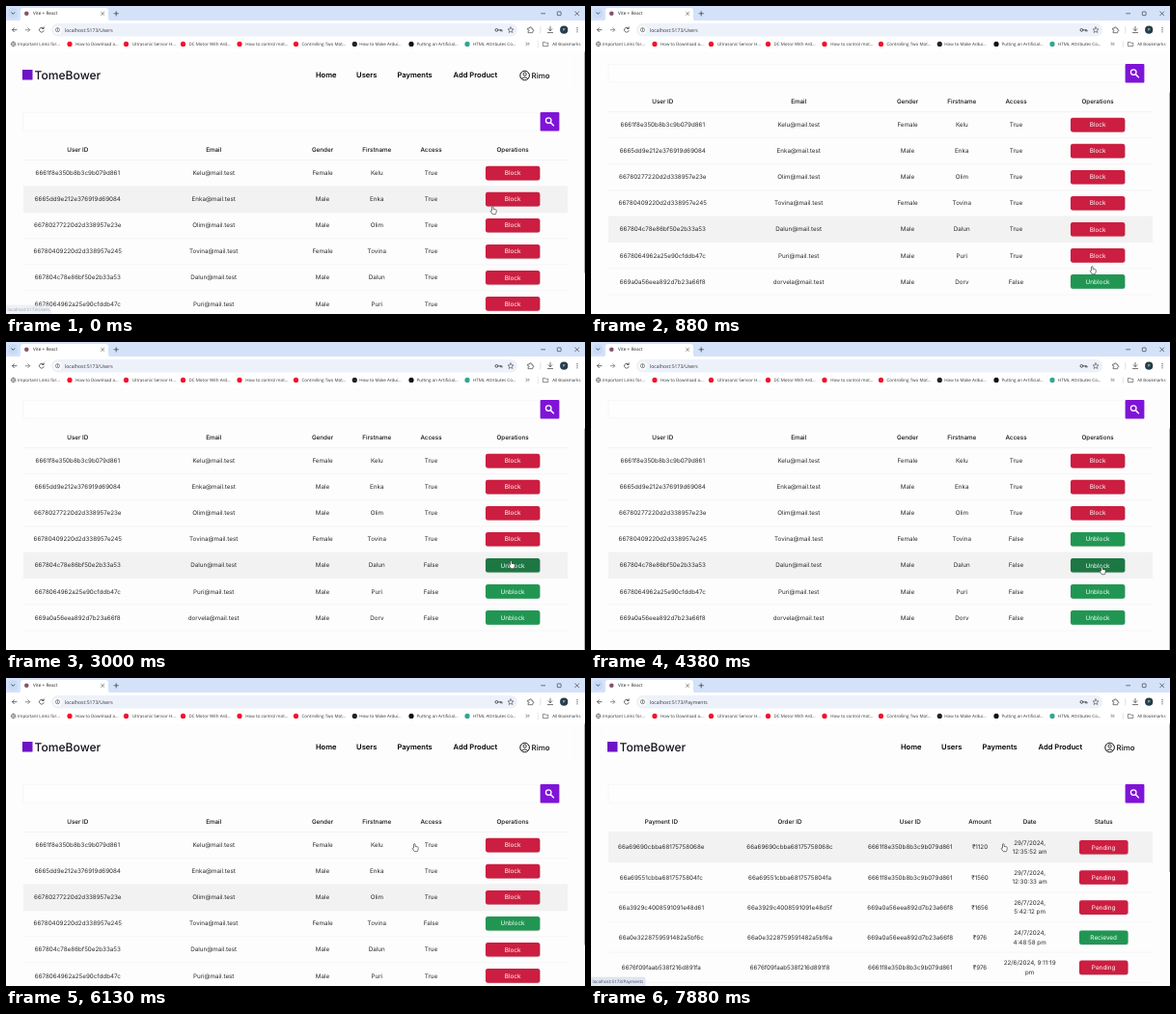
Write an HTML page that moves like this. It is 600 px wide and 319 px high and loops after 8 s.

```html
<!DOCTYPE html>
<html lang="en">
<head>
<meta charset="utf-8">
<title>User admin</title>
<style>
html, body { margin: 0; height: 100%; overflow: hidden; background: #fff; }
svg { display: block; width: 100vw; height: 100vh; }
text { font-family: Inter, "Open Sans", sans-serif; white-space: pre; text-rendering: geometricPrecision; }
.ui text { font-family: "Open Sans", sans-serif; }
</style>
</head>
<body>
<svg id="stage" viewBox="0 0 600 319" xmlns="http://www.w3.org/2000/svg">
  <defs><clipPath id="view"><rect y="47" width="600" height="272"/></clipPath></defs>
  <rect width="600" height="319" fill="#fdfdfd"/>
  <g clip-path="url(#view)"><g id="page"></g></g>
  <g id="chrome" class="ui"></g>
  <g id="over" class="ui"></g>
</svg>
<script>
const LOOP = 8000, TOP = 47, VIEW = 272;
const RED = '#cc1e41', DARK_RED = '#a51936', GREEN = '#219653', DARK_GREEN = '#1d7743';
const $ = id => document.getElementById(id);

const rect = (x, y, w, h, fill, r = 0, more = '') =>
  `<rect x="${x}" y="${y}" width="${w}" height="${h}" rx="${r}" fill="${fill}" ${more}/>`;
const dot = (x, y, r, fill, more = '') =>
  `<circle cx="${x}" cy="${y}" r="${r}" fill="${fill}" ${more}/>`;
const line = (d, color = '#444', w = 0.8) =>
  `<path d="${d}" fill="none" stroke="${color}" stroke-width="${w}" stroke-linecap="round" stroke-linejoin="round"/>`;
// y is the middle of the line of text
const text = (s, x, y, size, fill = '#2b2b2b', anchor = 'middle', weight = 400) =>
  `<text x="${x}" y="${(y + size * 0.36).toFixed(2)}" font-size="${size}" fill="${fill}" text-anchor="${anchor}" font-weight="${weight}">${s}</text>`;

const users = [
  ['6661f8e350b8b3c9b079d861', 'Kelu', 'Female'],
  ['6665dd9e212e376919d69084', 'Enka', 'Male'],
  ['66780277220d2d338957e23e', 'Olim', 'Male'],
  ['66780409220d2d338957e245', 'Tovina', 'Female'],
  ['667804c78e86bf50e2b33a53', 'Dalun', 'Male'],
  ['6678064962a25e90cfddb47c', 'Puri', 'Male'],
  ['669a0a56eea892d7b23a66f8', 'Dorv', 'Male', 'dorvela']
];
const payments = [
  ['66a69690cbba68175758068e', '66a69690cbba68175758068c', 0, '1120', '29/7/2024,', '12:35:52 am'],
  ['66a69551cbba6817575804fc', '66a69551cbba6817575804fa', 0, '1560', '29/7/2024,', '12:30:33 am'],
  ['66a3929c4008591091e48d61', '66a3929c4008591091e48d5f', 6, '1656', '26/7/2024,', '5:42:12 pm'],
  ['66a0e3228759591482a5bf6c', '66a0e3228759591482a5bf6a', 6, '976', '24/7/2024,', '4:48:58 pm'],
  ['6676f09faab538f216d891fa', '6676f09faab538f216d891f8', 0, '976', '22/6/2024, 9:11:19', 'pm']
];

// time, pointer x, pointer y, hovered row
const moves = [
  [0, 505, 211, 1], [130, 520, 273, 4], [1000, 520, 273, 6], [1250, 525, 285, 6],
  [1380, 526, 261, 5], [1750, 526, 234, 4], [2000, 527, 206, 3], [2130, 527, 179, 2],
  [2380, 526, 208, 3], [2500, 524, 230, 4], [3130, 529, 178, 2], [3380, 529, 208, 3],
  [4250, 530, 222, 4], [4380, 530, 236, 4], [5130, 530, 252, 5], [5250, 530, 260, 5],
  [5630, 490, 215, 3], [5750, 424, 175, 2], [6250, 424, 175, 0], [6880, 424, 112, -1],
  [7000, 424, 75, -1], [7750, 426, 120, -1], [7880, 428, 175, 0]
];
const scrolls = [[0, 0], [380, 22], [500, 39], [880, 50], [6000, 20], [6130, 0]];
// times at which a row's access is toggled
const toggles = { 3: [3880], 4: [2880, 4750], 5: [1630, 5380] };

const at = (keys, t) => keys.filter(k => k[0] <= t).pop();

function access(row, t) {
  const n = (toggles[row] || []).filter(k => k <= t).length;
  return (row < 6) === (n % 2 === 0);
}

function button(label, x, y, w, red, hot) {
  const fill = red ? (hot ? DARK_RED : RED) : (hot ? DARK_GREEN : GREEN);
  return rect(x - w / 2 + 0.3, y - 6.6, w + 0.2, 14.6, '#000', 2.5, 'opacity=".16"') +
    rect(x - w / 2, y - 7.2, w, 14.6, fill, 2.3) + text(label, x, y, 6.4, '#fff');
}

function rowBand(y, h, hover) {
  return (hover ? rect(18, y, 564, h, '#f2f2f2') : '') +
    line(`M18 ${y + h}H582`, '#ececee', 0.5);
}

function heads(names, xs) {
  return names.map((s, i) => text(s, xs[i], 148.7, 6.3, '#111', 'middle', 500)).join('') +
    line('M18 159.6H582', '#e6e6e8', 0.5);
}

function header() {
  const links = [['Home', 331.7], ['Users', 373.8], ['Payments', 423.6], ['Add Product', 486.4]];
  return rect(10, 52, 580, 39, 'none', 1, 'stroke="#f8f8f9" stroke-width=".5"') +
    rect(17, 66, 10.5, 10.5, '#6d14c4') +
    text('TomeBower', 29.5, 71.3, 12.1, '#15121c', 'start', 500) +
    links.map(([s, x]) => text(s, x, 71.3, 7.6, '#000', 'middle', 600)).join('') +
    dot(537.6, 72, 4.8, 'none', 'stroke="#111" stroke-width="1"') +
    dot(537.6, 70.5, 1.6, 'none', 'stroke="#111" stroke-width=".9"') +
    line('M534.5 75.3q3.1-3 6.2 0', '#111', 0.9) +
    text('Rimo', 544.6, 72, 7.9, '#111', 'start', 500) +
    rect(18, 110.3, 536, 18.8, '#fefefe', 1, 'stroke="#f1f1f3" stroke-width=".6"') +
    rect(553.6, 110.1, 19.8, 19.5, '#7f14d8', 1) +
    dot(562.2, 118.6, 2.8, 'none', 'stroke="#fff" stroke-width="1.3"') +
    line('M564.5 120.9L567.4 123.8', '#fff', 1.5);
}

function userTable(t, hover, px, py) {
  const xs = [74.3, 215.2, 328, 384.3, 440.5, 525.1];
  let out = heads(['User ID', 'Email', 'Gender', 'Firstname', 'Access', 'Operations'], xs);
  users.forEach(([id, name, gender, mail], i) => {
    const y = 173 + i * 27.05, ok = access(i, t);
    const hot = Math.abs(px - xs[5]) < 28 && Math.abs(py - y) < 7;
    out += rowBand(y - 13.4, 27.05, hover === i);
    [id, `${mail || name}@mail.test`, gender, name, ok ? 'True' : 'False']
      .forEach((s, c) => out += text(s, xs[c], y, 6.25));
    out += button(ok ? 'Block' : 'Unblock', xs[5], y, 56.3, ok, hot);
  });
  return out;
}

function paymentTable(hover, loaded) {
  const xs = [72.8, 206, 330.8, 403, 454.6, 531.2];
  let out = heads(['Payment ID', 'Order ID', 'User ID', 'Amount', 'Date', 'Status'], xs);
  if (loaded) payments.forEach(([id, order, user, sum, day, hour], i) => {
    const y = 175.2 + i * 31.15, open = i !== 3;
    out += rowBand(y - 15.6, 31.15, hover === i);
    [id, order, users[user][0], '₹' + sum].forEach((s, c) => out += text(s, xs[c], y, 6.25));
    out += text(day, xs[4], y - 4.7, 6.25) + text(hour, xs[4], y + 4.7, 6.25);
    out += button(open ? 'Pending' : 'Recieved', xs[5], y, 50.5, open, false);
  });
  return out;
}

function browser() {
  const marks = [
    ['Important Links for...', 7.6, 12, '#666'], ['How to Download a...', 66, 72, '#f0142c'],
    ['Ultrasonic Sensor H...', 124.5, 131, '#f0142c'], ['DC Motor With Ard...', 183.5, 189.5, '#f0142c'],
    ['How to control mot...', 242, 248.3, '#f0142c'], ['Controlling Two Mot...', 300.5, 306.5, '#f0142c'],
    ['How to Make Ardui...', 361.3, 366.3, '#222'], ['Putting an Artificial...', 420, 425.5, '#111'],
    ['HTML Attributes Co...', 478, 484, '#35a58c']
  ];
  return rect(0, 0, 600, 16, '#d3e2f9') + rect(0, 15, 600, 32, '#fff') +
    rect(2.5, 2.5, 9.5, 10, '#c8daf6', 3) + line('M5.8 6.8l1.5 1.6 1.5-1.6', '#333') +
    `<path d="M12 15.5q3 0 3-3V5q0-3 3-3h85q3 0 3 3v7.5q0 3 3 3z" fill="#fff"/>` +
    dot(21.3, 7.8, 2.3, '#85506f') + text('Vite + React', 28, 7.8, 4.7, '#222', 'start') +
    line('M98.6 6.3l3 3m0-3l-3 3', '#444', 0.6) + line('M112 7.8h4.4m-2.2-2.2v4.4', '#333', 0.7) +
    line('M554.6 7.8h4M589.7 5.8l4 4m0-4l-4 4', '#222', 0.6) +
    rect(571.3, 5.9, 3.8, 3.8, 'none', 0.5, 'stroke="#222" stroke-width=".6"') +
    line('M11 24.7H6.5m2-2l-2 2 2 2') + line('M20.2 24.7h4.5m-2-2l2 2-2 2', '#777') +
    line('M38.8 23.2a2.4 2.4 0 1 0 .4 2.4M39.2 21.8v1.7h-1.7') +
    rect(47, 18, 483, 13.4, '#edf1fa', 6.7) + dot(53.5, 24.7, 4.2, '#fff') +
    dot(53.5, 24.7, 2.1, 'none', 'stroke="#444" stroke-width=".6"') + line('M53.5 24.5v1.1M53.5 23.4v.1', '#444', 0.6) +
    dot(508.4, 24.9, 1.4, 'none', 'stroke="#333" stroke-width=".8"') + line('M510 24.9h4v1.2m-1.4-1.2v1', '#333') +
    line('M523 21.9l.9 1.9 2.1.2-1.6 1.4.5 2.1-1.9-1.1-1.9 1.1.5-2.1-1.6-1.4 2.1-.2z', '#444', 0.6) +
    line('M541 23h1.4q0-1.3.9-1.3t.9 1.3h1.5v1.5q1.2.1 1.2.9t-1.2.9v1.4H541v-1.5q1-.1 1-.8t-1-.8z', '#444', 0.7) +
    line('M553.8 21.5v6.5', '#c3d3ee', 0.7) +
    line('M564 21.5v4m-1.8-1.7l1.8 1.8 1.8-1.8M561.5 27.6h5') +
    dot(578.2, 24.7, 4.1, '#263d4b') + text('P', 578.2, 24.7, 4.2, '#fff') +
    [22.6, 24.7, 26.8].map(y => dot(592, y, 0.6, '#333')).join('') +
    marks.map(([s, ix, x, c], i) => dot(ix, 39.4, i ? 2.6 : 2.3, i ? c : 'none', i ? '' : `stroke="${c}" stroke-width=".7"`) +
      text(s, x, 39.3, 4.5, '#333', 'start')).join('') +
    line('M5.3 39.4h4.6M7.6 37.1q-1.8 2.3 0 4.6 1.8-2.3 0-4.6', '#666', 0.5) +
    line('M539 38.1l1.2 1.2-1.2 1.2m2-2.4l1.2 1.2-1.2 1.2', '#333', 0.6) +
    line('M551.3 36.5v6', '#c3d3ee', 0.6) +
    line('M556.8 37.4h1.8l.7.8h2.5v3.4h-5z', '#444', 0.6) +
    text('All Bookmarks', 566.2, 39.3, 4.4, '#333', 'start');
}

const hand = (x, y) => `<g transform="translate(${x + 0.4} ${y + 0.4})"><path d="M-1.9 .7V-3.3q.8-1.1 1.6 0V-1l2.5.5q.9.3.7 1.3L2.4 3.2 1.9 4.3h-3L-3.2 1.3q.1-1 1.3-.6z" fill="#fff" stroke="#222" stroke-width=".6" stroke-linejoin="round"/></g>`;

function status(page, opacity) {
  const w = page === 'Users' ? 46.5 : 56;
  return `<g opacity="${opacity}">` +
    rect(-2, 310, w + 2, 11, '#dfe7f5', 1.5, 'stroke="#c9d2e2" stroke-width=".4"') +
    text('localhost:5173/' + page, 1.5, 314.7, 4.5, '#444', 'start') + '</g>';
}

function draw(t) {
  const [, x, y, hover] = at(moves, t);
  const scroll = at(scrolls, t)[1];
  const paying = t >= 7500;
  const full = paying ? 480 : 322;

  $('page').setAttribute('transform', `translate(0 ${-scroll})`);
  $('page').innerHTML = header() + (paying
    ? paymentTable(hover, t >= 7630)
    : userTable(t, hover, x, y - 3.6 + scroll));

  $('over').innerHTML =
    text('localhost:5173/' + (paying ? 'Payments' : 'Users'), 61, 24.7, 5.1, '#333', 'start') +
    rect(599.2, TOP + scroll * VIEW / full, 0.8, VIEW * VIEW / full, '#a8a8a8', 0.4) +
    (t < 130 ? status('Users', 0.5) : t >= 7000 ? status('Payments', 1) : '') +
    hand(x, y);
}

$('chrome').innerHTML = browser();
const cuts = [...new Set([...moves, ...scrolls].map(k => k[0])
  .concat(...Object.values(toggles), 7500, 7630))].sort((a, b) => a - b);
const start = performance.now();
let shown = -1;
function tick() {
  const t = (performance.now() - start) % LOOP;
  const cut = cuts.filter(c => c <= t).pop();
  if (cut !== shown) draw(shown = cut);
  requestAnimationFrame(tick);
}
tick();
</script>
</body>
</html>
```
